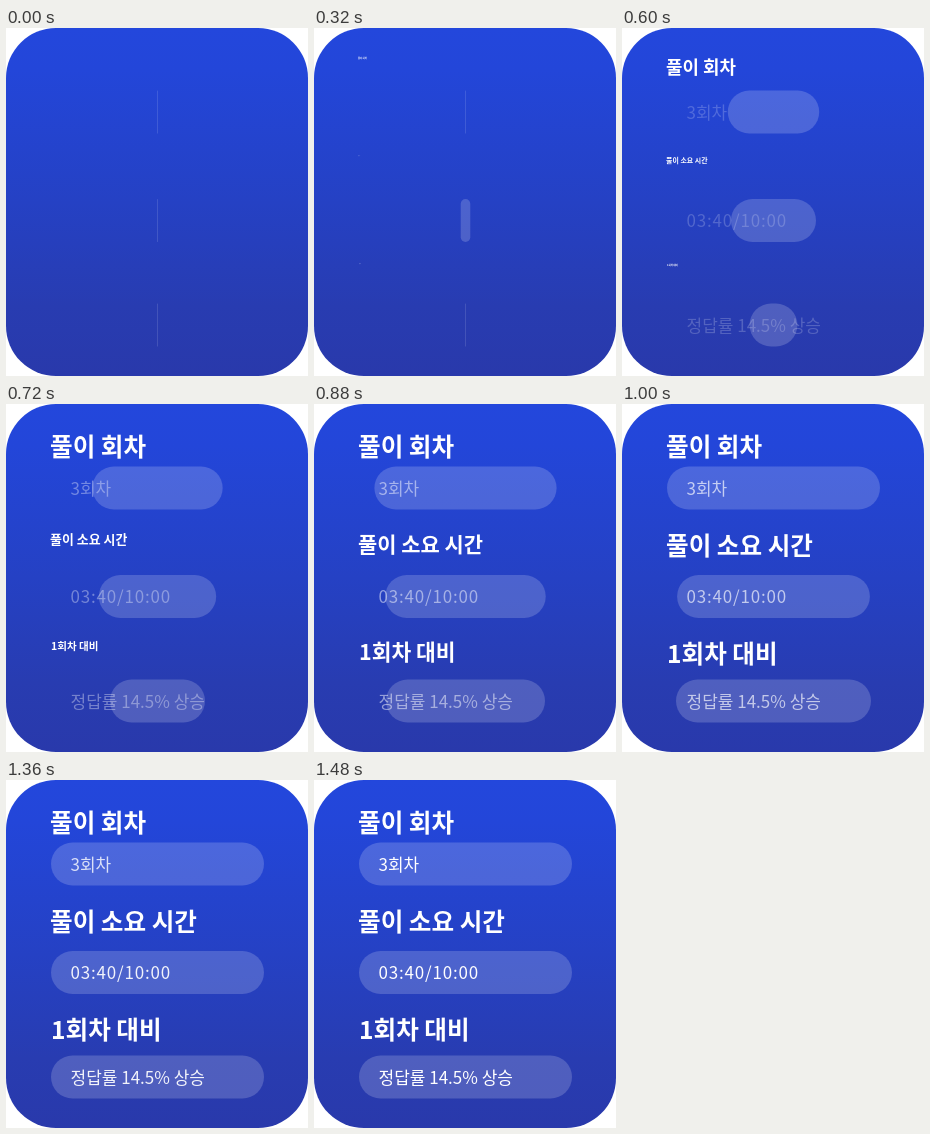
Write an HTML page with a canvas that moves like this. It is 302 px wide and 348 px high and loops after 2 s.

```html
<!DOCTYPE html>
<html lang="ko">
<head>
<meta charset="utf-8">
<style>
html, body { margin: 0; width: 100%; height: 100%; overflow: hidden; background: #fff; }
canvas { display: block; }
</style>
</head>
<body>
<canvas id="stage" width="302" height="348"></canvas>
<script>
const ctx = document.getElementById('stage').getContext('2d');
const LOOP = 2000, STEP = 40;
const FONT = '"Noto Sans CJK KR", "Noto Sans CJK", sans-serif';

const backdrop = ctx.createLinearGradient(0, 0, 0, 348);
backdrop.addColorStop(0, '#2347dc');
backdrop.addColorStop(0.12, '#2346d9');
backdrop.addColorStop(0.5, '#2541c4');
backdrop.addColorStop(0.8, '#283cb1');
backdrop.addColorStop(1, '#2939ab');

// Linear interpolation through [time, value] pairs
function at(keys, t) {
  if (t <= keys[0][0]) return keys[0][1];
  for (let i = 1; i < keys.length; i++) {
    const [t0, v0] = keys[i - 1], [t1, v1] = keys[i];
    if (t <= t1) return v0 + (v1 - v0) * (t - t0) / (t1 - t0);
  }
  return keys[keys.length - 1][1];
}

const fade = [[440, 0], [720, 0.36], [880, 0.5], [1000, 0.66], [1240, 0.85], [1480, 1]];
const refade = [[440, 0], [720, 0.36], [880, 0.5], [1000, 0.68], [1080, 0.75], [1220, 0.08], [1400, 1]];

const rows = [
  { title: '풀이 회차', x: 44, top: 29, grow: [[280, 0], [720, 1]], shown: 320,
    pillY: 62.5, width: [[320, 0.7], [975, 213]],
    value: '3회차', base: 91, fade: refade, spacing: 0 },
  { title: '풀이 소요 시간', x: 44, top: 128, grow: [[468, 0.015], [953, 1]], shown: 120,
    pillY: 171, width: [[287, 0.7], [1075, 213]],
    value: '03:40/10:00', base: 199, fade, spacing: 0.8 },
  { title: '1회차 대비', x: 45, top: 236, grow: [[570, 0.015], [926, 1]], shown: 320,
    pillY: 275.5, width: [[480, 0.7], [720, 95], [880, 159], [1000, 195], [1060, 213]],
    value: '정답률 14.5% 상승', base: 304, fade, spacing: 0 }
];

function box(x, y, w, h, r, fill) {
  ctx.fillStyle = fill;
  ctx.beginPath();
  ctx.roundRect(x, y, w, h, r);
  ctx.fill();
}

function drawRow(row, t) {
  const w = at(row.width, t);
  box(151.5 - w / 2, row.pillY, w, 43, Math.min(21.5, w / 2), 'rgba(255,255,255,0.18)');

  ctx.fillStyle = '#fff';
  ctx.globalAlpha = at(row.fade, t);
  ctx.font = '500 17px ' + FONT;
  ctx.letterSpacing = row.spacing + 'px';
  ctx.fillText(row.value, 64.5, row.base);
  ctx.globalAlpha = 1;
  ctx.letterSpacing = '0px';

  if (t < row.shown) return;
  const scale = at(row.grow, t);
  ctx.save();
  ctx.translate(row.x, row.top);
  ctx.scale(scale, scale);
  ctx.font = '700 24.6px ' + FONT;
  ctx.fillText(row.title, 0, 23);
  ctx.restore();
}

function draw(now) {
  const t = Math.floor(now % LOOP / STEP) * STEP;
  ctx.clearRect(0, 0, 302, 348);
  box(0, 0, 302, 348, 50, backdrop);
  rows.forEach(row => drawRow(row, t));
}

const start = performance.now();
function tick() {
  draw(performance.now() - start);
  requestAnimationFrame(tick);
}
tick();
</script>
</body>
</html>
```
